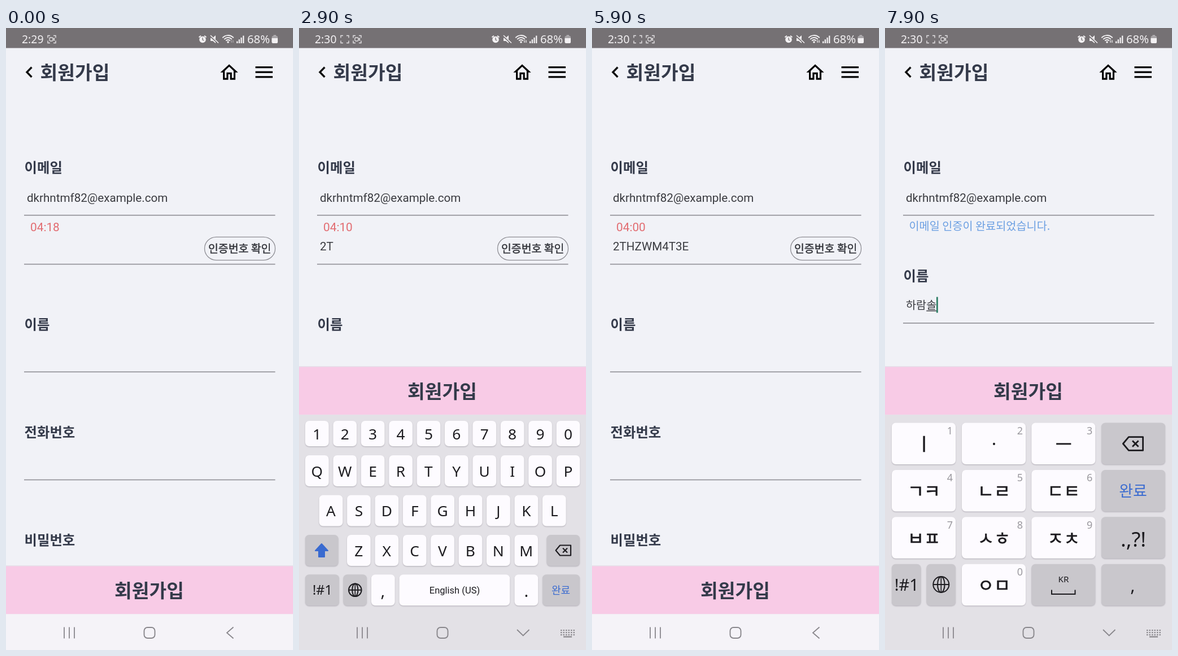
Recreate the animation shown at these times as an HTML page with a canvas. Size 508 px wide and 1102 px high, loop 8 s.

```html
<!DOCTYPE html>
<html lang="ko">
<head>
<meta charset="utf-8">
<title>회원가입</title>
<style>
html, body { margin: 0; width: 100%; height: 100%; overflow: hidden; background: #f1f2f7; }
canvas { display: block; width: 508px; height: 1102px; }
</style>
</head>
<body>
<canvas id="stage"></canvas>
<script>
const W = 508, H = 1102, LOOP = 8000;
const cv = document.getElementById('stage');
const dpr = window.devicePixelRatio || 1;
cv.width = W * dpr;
cv.height = H * dpr;
const c = cv.getContext('2d');

// mid: distance from the visual centre of a line to its baseline, in em
const KR = { fam: '"Noto Sans CJK KR", "Noto Sans CJK", sans-serif', mid: 0.38 };
const RO = { fam: 'Roboto, sans-serif', mid: 0.355 };
const NS = { fam: '"Noto Sans", sans-serif', mid: 0.357 };

const INK = '#343a4a', DARK = '#1c1b1f', LINE = '#8e8e94', BLUE = '#3a6bd0', CARET = '#2f7f66';
const EMAIL = 'dkrhntmf82@example.com';
const CODE = '2THZWM4T3E';
const CODE_AT = [1700, 2500, 3100, 3600, 4000, 4400, 4700, 5000, 5300, 5500];
const NAME = ['ㅎ', '하', '하ㄹ', '하라', '하람', '하람소', '하람솔'];
const NAME_KEY = ['ㅅㅎ', 'ㅣ', 'ㄴㄹ', 'ㅣ', 'ㅇㅁ', 'ㅅㅎ', 'ㄴㄹ'];
const NAME_AT = [7300, 7400, 7500, 7600, 7700, 7800, 7900];
const OPEN = 400, POPUP = 600, MINUTE = 1400, CAPS = 2100, CLOSE = 5800, DONE = 6600, REOPEN = 7000, KOREAN = 7200;

function text(s, x, y, size, color, font, align = 'left', weight = 400) {
  c.font = `${weight} ${size}px ${font.fam}`;
  c.fillStyle = color;
  c.textAlign = align;
  c.fillText(s, x, y + font.mid * size);
  // the Korean face has no medium cut, so thicken the regular one
  if (font === KR && weight === 500) {
    c.strokeStyle = color;
    c.lineWidth = size * 0.02;
    c.strokeText(s, x, y + font.mid * size);
  }
  return c.measureText(s).width;
}

function rect(x, y, w, h, color) {
  c.fillStyle = color;
  c.fillRect(x, y, w, h);
}

function round(x, y, w, h, r) {
  c.beginPath();
  c.roundRect(x, y, w, h, r);
}

function stroke(pts, color, width, close) {
  c.beginPath();
  pts.forEach(([x, y], i) => i ? c.lineTo(x, y) : c.moveTo(x, y));
  if (close) c.closePath();
  c.strokeStyle = color;
  c.lineWidth = width;
  c.stroke();
}

function arc(x, y, r, a, b, color, width) {
  c.beginPath();
  c.arc(x, y, r, a, b);
  c.strokeStyle = color;
  c.lineWidth = width;
  c.stroke();
}

function card(x, y, w, h, r, color, shadow, blur, drop) {
  c.save();
  c.shadowColor = shadow;
  c.shadowBlur = blur * dpr;
  c.shadowOffsetY = drop * dpr;
  c.fillStyle = color;
  round(x, y, w, h, r);
  c.fill();
  c.restore();
}

function captureIcon(x, cam) {
  const col = '#e4e2e4';
  for (const sx of [-1, 1]) for (const sy of [-1, 1]) {
    const px = x + 8 + sx * 7, py = 20 + sy * 6.5;
    stroke([[px - sx * 4, py], [px, py], [px, py - sy * 4]], col, 1.4);
  }
  if (!cam) return;
  c.strokeStyle = col;
  c.lineWidth = 1.3;
  round(x + 4, 17, 6, 6, 1.5);
  c.stroke();
  stroke([[x + 10, 19.5], [x + 12.5, 18], [x + 12.5, 22], [x + 10, 20.5]], col, 1.2);
}

function status(t) {
  const col = '#f3f1f3';
  rect(0, 0, W, 35.5, '#757174');
  text(t < MINUTE ? '2:29' : '2:30', 28, 19.8, 19.4, col, NS);
  const phase = t % 1000;
  captureIcon(73, t < 300 || phase >= 100 && phase < 300);
  if (t >= 300) captureIcon(95, true);
  // alarm
  c.fillStyle = col;
  c.beginPath();
  c.arc(348, 20.5, 5.8, 0, 7);
  c.fill();
  stroke([[341.5, 16.5], [345, 13.8]], col, 2);
  stroke([[354.5, 16.5], [351, 13.8]], col, 2);
  stroke([[348, 17], [348, 21], [350.5, 22]], '#757174', 1.3);
  // muted speaker
  c.fillStyle = col;
  c.beginPath();
  [[362, 17.5], [366, 17.5], [371, 13], [371, 27], [366, 23], [362, 23]].forEach(p => c.lineTo(...p));
  c.fill();
  stroke([[361, 13.5], [376, 27]], '#757174', 3.4);
  stroke([[362, 13], [376, 26.5]], col, 1.6);
  // wifi
  for (const r of [5, 9, 13]) arc(393, 26, r, -Math.PI * 0.77, -Math.PI * 0.23, col, 1.8);
  c.beginPath();
  c.arc(393, 25, 1.8, 0, 7);
  c.fill();
  const arrow = t < 100 ? '#aaa7aa' : col;
  stroke([[399, 26], [399, 21.5]], arrow, 1.3);
  stroke([[402, 21.5], [402, 26]], arrow, 1.3);
  for (let i = 0; i < 4; i++) rect(408 + i * 3.7, 23.5 - i * 3.3, 2.3, 3.5 + i * 3.3, col);
  text('68%', 427, 19.8, 20.3, col, NS);
  // battery
  rect(473.5, 12.5, 4.5, 2, '#b9b6b9');
  round(470.5, 14, 10.5, 13, 2.5);
  c.fillStyle = '#a7a4a7';
  c.fill();
  round(470.5, 18, 10.5, 9, [0, 0, 2.5, 2.5]);
  c.fillStyle = col;
  c.fill();
}

const house = new Path2D('M12 5.69l5 4.5V18h-2v-6H9v6H7v-7.81l5-4.5M12 3L2 12h3v8h6v-6h2v6h6v-8h3L12 3z');

function header() {
  stroke([[45.5, 69.5], [37, 78.2], [45.5, 87]], '#111', 3.4);
  text('회원가입', 60.5, 78, 33.4, INK, KR, 'left', 700);
  c.save();
  c.translate(376.2, 59.4);
  c.scale(1.57, 1.62);
  c.fillStyle = '#000';
  c.fill(house, 'evenodd');
  c.restore();
  for (const y of [69.6, 78.2, 86.8]) rect(441.5, y - 1.6, 30.5, 3.2, '#000');
}

const rule = y => rect(32, y - 0.8, 444.5, 1.6, LINE);
const label = (s, y) => text(s, 32.5, y, 24.4, INK, KR, 'left', 700);
const caret = (x, y) => rect(x - 1.4, y - 14, 2.8, 28, CARET);

// blink restarts with every key
function blinkOn(t, times, start) {
  const last = times.filter(k => k <= t).pop() || start;
  return Math.floor((t - last) / 210) % 2 === 0;
}

function form(t) {
  const done = t >= DONE, up = done ? 86.5 : 0;
  label('이메일', 247);
  text(EMAIL, 37, 300.3, 20.6, '#3a3b40', RO);
  rule(331.7);
  if (done) {
    text('이메일 인증이 완료되었습니다.', 42.5, 351, 19.7, '#6b9fe2', KR);
  } else {
    const left = Math.floor(258.9 - 3.05 * t / 1000);
    const pad = n => String(n).padStart(2, '0');
    text(`${pad(Math.floor(left / 60))}:${pad(left % 60)}`, 43, 353, 20.8, '#e26b70', RO);
    const n = CODE_AT.filter(k => k <= t).length;
    const w = text(CODE.slice(0, n), 37, 387, 20.6, '#3a3b40', RO);
    if (t >= OPEN && t < CLOSE && blinkOn(t, CODE_AT, OPEN)) caret(n ? 37 + w : 38.5, 386);
    c.strokeStyle = LINE;
    c.lineWidth = 1.3;
    round(351.5, 370.3, 125, 41, 20.5);
    c.stroke();
    text('인증번호 확인', 413.7, 391, 19.4, '#303238', KR, 'center', 500);
    rule(418.5);
  }
  label('이름', 525 - up);
  rule(609.3 - up);
  label('전화번호', 716 - up);
  rule(800.5 - up);
  label('비밀번호', 907 - up);
  rule(991.7 - up);
  if (t >= REOPEN) nameField(t);
}

function nameField(t) {
  const n = NAME_AT.filter(k => k <= t).length;
  let w = 0;
  if (n) {
    const s = NAME[n - 1];
    w = text(s, 37, 491, 19.7, '#3a3b40', KR);
    const one = c.measureText(s.slice(-1)).width;
    rect(37 + w - one, 500.5, one, 1.4, '#3a3b40');
  }
  if (blinkOn(t, NAME_AT, REOPEN)) caret(n ? 38 + w : 38.5, 490.5);
}

function submit(y) {
  rect(0, y - 1.5, W, 2, '#e6e2ea');
  rect(0, y, W, 85, '#f8cbe6');
  text('회원가입', 253.5, y + 43, 33.4, INK, KR, 'center', 700);
}

function popup(y) {
  card(32, y, 320, 97, 9, '#fff', 'rgba(40,40,50,.28)', 6, 2);
  text('HARUVEN', 126.5, y + 28, 16.8, '#5c5c60', NS, 'left', 800);
  text('Pass', 217, y + 28, 18.8, '#5c5c60', NS, 'left', 600);
  text('계정 보기', 192, y + 66, 17.9, '#434348', KR, 'center', 500);
  rect(157.5, y + 75, 69, 1.5, '#434348');
}

function navBar(keys) {
  const col = '#89878c';
  for (const x of [103, 112, 121]) rect(x - 0.9, 1061.5, 1.8, 20, col);
  c.strokeStyle = col;
  c.lineWidth = 1.9;
  round(244.5, 1062, 19, 19, 6);
  c.stroke();
  if (!keys) {
    stroke([[402.5, 1061.5], [391, 1071.5], [402.5, 1081.5]], col, 1.8);
    return;
  }
  stroke([[386, 1066], [396.7, 1076.5], [407.5, 1066]], col, 1.8);
  for (let r = 0; r < 3; r++)
    for (let i = 0; i < 6; i++) rect(463 + i * 4.5, 1066 + r * 4, 2.4, 2.2, col);
  rect(468, 1077.5, 15, 2.2, col);
}

function key(x, y, w, h, dark, down) {
  const fill = down ? (dark ? '#b7b6bb' : '#e6e5ea') : dark ? '#c9c7cc' : '#fdfbff';
  card(x, y, w, h, 7, fill, 'rgba(60,55,70,.26)', 2, 1.2);
}

function globe(x, y, r) {
  arc(x, y, r, 0, 7, DARK, 2);
  c.beginPath();
  c.ellipse(x, y, r * 0.45, r, 0, 0, 7);
  c.stroke();
  stroke([[x - r, y], [x + r, y]], DARK, 2);
  stroke([[x, y - r], [x, y + r]], DARK, 1.6);
}

function backspace(x, y, s) {
  c.save();
  c.translate(x, y);
  c.scale(s, s);
  c.lineJoin = 'round';
  stroke([[-13.5, 0], [-6, -9], [13, -9], [13, 9], [-6, 9]], DARK, 2.1, true);
  stroke([[-1, -4], [7, 4]], DARK, 2.1);
  stroke([[7, -4], [-1, 4]], DARK, 2.1);
  c.restore();
}

function shiftIcon(on) {
  c.lineJoin = 'round';
  const pts = [[40, 914], [51, 926], [45, 926], [45, 937], [35, 937], [35, 926], [29, 926]];
  stroke(pts, on ? BLUE : DARK, 2, true);
  if (on) {
    c.fillStyle = BLUE;
    c.fill();
  }
}

function latin(t) {
  const caps = t >= CAPS && t < CLOSE;
  const hit = CODE_AT.indexOf(t);
  const pressed = hit < 0 ? '' : CODE[hit];
  const rows = [['1234567890', 11, 696, 45], ['qwertyuiop', 11, 757, 55], ['asdfghjkl', 35.7, 827.5, 55], ['zxcvbnm', 85, 898, 55]];
  for (const [keys, x0, y, h] of rows) {
    [...keys].forEach((k, i) => {
      const x = x0 + i * 49.4, s = caps ? k.toUpperCase() : k;
      key(x, y, 41.7, h, false, s === pressed);
      const size = /[a-z]/.test(s) ? 28 : 26.3;
      text(s, x + 20.8, y + h / 2 + 0.8, size, DARK, NS, 'center');
    });
  }
  key(11, 898, 58.5, 55, true, t === CAPS);
  shiftIcon(caps);
  key(438.5, 898, 58.5, 55, true);
  backspace(468, 925.5, 1);
  key(11, 968.3, 60, 55, true);
  text('!#1', 41.5, 996, 23.7, DARK, NS, 'center', 500);
  key(78.5, 968.3, 41.5, 55, true);
  globe(99.3, 995.7, 11.3);
  key(128, 968.3, 41.7, 55);
  text(',', 148.5, 998, 29, DARK, NS, 'center', 500);
  key(177.5, 968.3, 195.7, 55);
  text('English (US)', 275.5, 996, 16.5, DARK, RO, 'center');
  key(381.5, 968.3, 41.7, 55);
  text('.', 402.5, 998, 29, DARK, NS, 'center', 500);
  key(431, 968.3, 66, 55, true);
  text('완료', 463.5, 996, 18, BLUE, KR, 'center');
}

function korean(t) {
  const hit = NAME_AT.indexOf(t);
  const pressed = hit < 0 || t >= 7900 ? '' : NAME_KEY[hit];
  const xs = [12, 136, 259.3, 383], ys = [699.5, 783, 866.3, 949.7], w = 113, h = 73.5;
  const jamo = (s, col, row, num) => {
    const x = xs[col], y = ys[row];
    key(x, y, w, h, false, s === pressed);
    text(s, x + w / 2 + 0.5, y + h / 2 + 0.7, 31.5, DARK, s === '·' ? NS : KR, 'center', 500);
    text(num, x + 108, y + 14, 18, '#99979d', NS, 'right');
  };
  ['ㅣ', '·', 'ㅡ', 'ㄱㅋ', 'ㄴㄹ', 'ㄷㅌ', 'ㅂㅍ', 'ㅅㅎ', 'ㅈㅊ']
    .forEach((s, i) => jamo(s, i % 3, Math.floor(i / 3), String(i + 1)));
  jamo('ㅇㅁ', 1, 3, '0');
  for (const y of ys) key(xs[3], y, w, h, true);
  backspace(439.3, 736.5, 1.33);
  text('완료', 439, 819.5, 27, BLUE, KR, 'center');
  text('.,?!', 439.5, 905.5, 36.5, DARK, NS, 'center');
  text(',', 438.5, 988, 31, DARK, NS, 'center', 500);
  key(12, ys[3], 51.5, h, true);
  text('!#1', 38.3, 986.5, 29, DARK, NS, 'center', 500);
  key(73.5, ys[3], 51.5, h, true);
  globe(99.3, 986, 14);
  key(xs[2], ys[3], w, h, true);
  text('KR', 316, 977, 15.2, DARK, NS, 'center');
  stroke([[295, 995.5], [295, 1003], [336.5, 1003], [336.5, 995.5]], DARK, 2);
}

function draw(t) {
  const sliding = t >= OPEN && t < OPEN + 100;
  const open = t >= OPEN && t < CLOSE || t >= REOPEN;
  c.setTransform(dpr, 0, 0, dpr, 0, 0);
  c.lineJoin = 'miter';
  rect(0, 0, W, H, '#f1f2f7');
  header();
  form(t);
  submit(open && !sliding ? 600.5 : 953.5);
  rect(0, 1038.5, W, 64, '#f5f3f8');
  if (open) {
    c.save();
    if (sliding) c.translate(0, 190);
    rect(0, 685.3, W, 417, '#e3e1e6');
    (t >= KOREAN ? korean : latin)(t);
    c.restore();
    if (sliding) rect(0, 1038.5, W, 64, '#e3e1e6');
  }
  navBar(open);
  if (t >= POPUP && t < CODE_AT[0]) popup(419.5);
  if (t >= REOPEN && t < KOREAN) popup(524);
  status(t);
}

const start = performance.now();
function tick() {
  const t = (performance.now() - start) % LOOP;
  draw(Math.floor(t / 100) * 100);
  requestAnimationFrame(tick);
}
tick();
</script>
</body>
</html>
```
